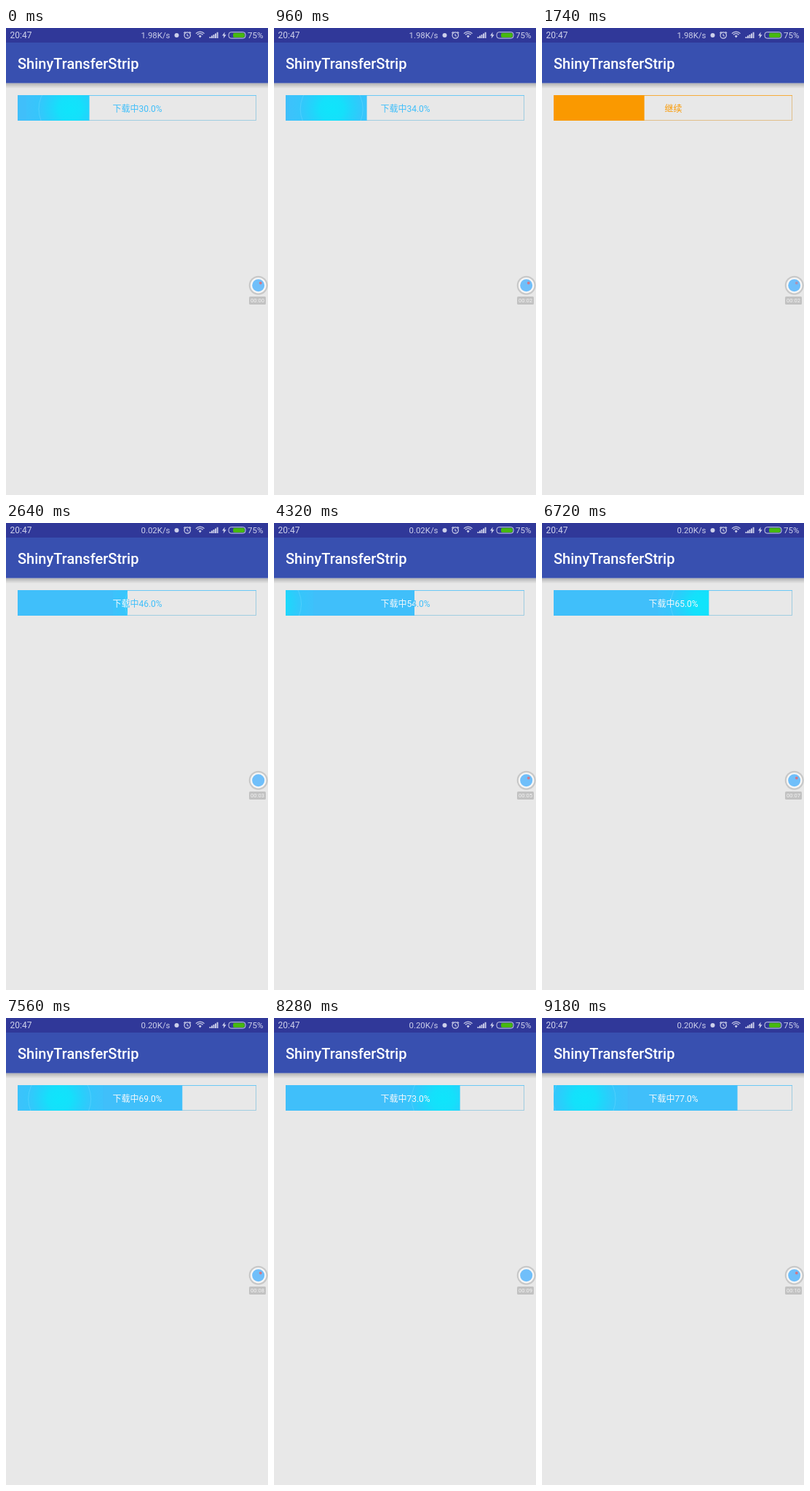
These frames come from a looping animation (360x640 px, 9.24 s). An HTML page:

```html
<!DOCTYPE html>
<html lang="zh-CN">
<head>
<meta charset="utf-8">
<title>Download progress</title>
<style>
  html, body { margin: 0; width: 100%; height: 100%; overflow: hidden; background: #e8e8e8; }
  svg { display: block; width: 100vw; height: 100vh; }
  text { font-family: Roboto, "Noto Sans CJK SC", "Noto Sans CJK", sans-serif; }
  .status { fill: #cdd0ea; }
  .line { fill: none; stroke: #cdd0ea; }
  .label { font-size: 12px; text-anchor: middle; }
</style>
</head>
<body>
<svg viewBox="0 0 360 640">
  <defs>
    <linearGradient id="shadow" x2="0" y2="1">
      <stop offset="0" stop-color="#000" stop-opacity=".24"/>
      <stop offset=".5" stop-color="#000" stop-opacity=".11"/>
      <stop offset="1" stop-color="#000" stop-opacity="0"/>
    </linearGradient>
    <radialGradient id="glow">
      <stop offset="0" stop-color="#0fe5fb"/>
      <stop offset=".27" stop-color="#12e2fb" stop-opacity=".95"/>
      <stop offset=".53" stop-color="#18dafb" stop-opacity=".57"/>
      <stop offset=".75" stop-color="#20d2fb" stop-opacity=".22"/>
      <stop offset="1" stop-color="#28ccfb" stop-opacity="0"/>
    </radialGradient>
    <clipPath id="done"><rect id="doneRect" x="16" y="92" height="35"/></clipPath>
  </defs>

  <rect width="360" height="640" fill="#e8e8e8"/>
  <rect y="75.5" width="360" height="7.5" fill="url(#shadow)"/>
  <rect y="20" width="360" height="55.5" fill="#3850b0"/>
  <rect width="360" height="20" fill="#303899"/>
  <text x="16" y="55.5" font-size="20" font-weight="500" fill="#fff">ShinyTransferStrip</text>

  <g class="status">
    <text x="5.5" y="14" font-size="12">20:47</text>
    <text id="speed" x="225.5" y="14" font-size="11.4" text-anchor="end"></text>
    <text x="332" y="14" font-size="11.6">75%</text>
    <circle cx="234.5" cy="10" r="3"/>
    <path d="M262.4 8.7 263.4 9.7A4.7 4.7 0 0 1 270 9.7L271 8.7A6.1 6.1 0 0 0 262.4 8.7ZM264.7 11.1 266.7 13.6 268.7 11.1A2.8 2.8 0 0 0 264.7 11.1Z"/>
    <path d="M279.5 12h1.9v2h-1.9zM282 10.6h1.9V14H282zM284.5 9h1.9v5h-1.9zM287 7.4h1.9V14H287zM289.6 5.8h1.9V14h-1.9z"/>
    <path d="M300.6 5.5 297 10.6h2.3L298.6 14.5 302.6 9.2h-2.4z"/>
  </g>
  <g class="line">
    <circle cx="249.2" cy="10" r="4.2" stroke-width="1.2"/>
    <path d="M244.3 7 246.4 5.2M254.1 7 252 5.2M249 8v2.4l1.8.9" stroke-width="1.1"/>
    <path d="M260.9 7.6A8 8 0 0 1 272.5 7.6" stroke-width="1.3"/>
    <rect x="306" y="5.7" width="23" height="8.4" rx="3.2" stroke-width="1"/>
  </g>
  <rect x="312" y="6.8" width="15.8" height="6.2" rx="1.8" fill="#46b810"/>

  <g id="bar">
    <path d="M16 126.5H343.5V93" fill="none" stroke="#888" stroke-opacity=".22"/>
    <path d="M16 126.5H343.5V93" fill="none" stroke="currentColor" stroke-opacity=".35"/>
    <path d="M16 92.5H344" fill="none" stroke="currentColor" stroke-opacity=".75"/>
    <text class="label" x="180.5" y="115" fill="currentColor"></text>
    <g clip-path="url(#done)">
      <rect x="16" y="92" width="328" height="35" fill="currentColor"/>
      <g id="flare">
        <rect x="-60" y="92" width="120" height="35" fill="#28ccfb" fill-opacity=".15"/>
        <circle cy="111" r="60" fill="url(#glow)"/>
        <circle cy="111" r="43" fill="none" stroke="#8ce0ff" stroke-opacity=".3"/>
      </g>
      <text class="label" x="180.5" y="115" fill="#f4f8fa"></text>
    </g>
  </g>

  <circle cx="346.7" cy="352.7" r="13" fill="#c8c8c8"/>
  <circle cx="346.7" cy="352.7" r="10.8" fill="#f6f6f6"/>
  <circle cx="346.7" cy="352.7" r="8.5" fill="#70bffa"/>
  <circle id="dot" cx="349.8" cy="349.5" r="1.9" fill="#d07888"/>
  <rect x="334" y="368" width="23" height="11" rx="1.5" fill="#c2c2c2"/>
  <text id="clock" x="345.5" y="376.4" font-size="7.6" text-anchor="middle" fill="#f4f4f4"></text>
</svg>

<script>
const LOOP = 9240, STEP = 60;
const BAR = { x: 16, width: 328 };
const FLARE = { width: 120, speed: 0.22 };
const PAUSE = [1680, 1860];
// [time in ms, percent]
const progress = [[0, 30], [1680, 38], [1860, 38], [2640, 46], [4320, 54],
                  [6720, 65], [8280, 73], [9180, 77], [9240, 77]];
const sweeps = [-600, 400, 1500, 2775, 4145, 5520, 7025, 8716];
const ticks = [0, 180, 360, 2460, 3420, 4320, 5280, 6300, 7260, 8220, 9120];
const speeds = [[0, "1.98K/s"], [2220, "0.02K/s"], [6060, "0.20K/s"]];

const $ = id => document.getElementById(id);
const labels = document.querySelectorAll(".label");
const clamp = v => Math.max(0, Math.min(1, v));

function percentAt(t) {
  const i = progress.findIndex(([end]) => end > t);
  const [t0, p0] = progress[i - 1], [t1, p1] = progress[i];
  return Math.floor(p0 + (p1 - p0) * (t - t0) / (t1 - t0) + 0.05);
}

function draw(t) {
  const percent = percentAt(t);
  const paused = t >= PAUSE[0] && t < PAUSE[1];
  const caption = paused ? "继续" : `下载中${percent}.0%`;
  $("doneRect").setAttribute("width", BAR.width * percent / 100);
  $("bar").style.color = paused ? "#fa9900" : "#40bffa";
  labels.forEach(label => { label.textContent = caption; });

  const start = sweeps.filter(s => s <= t).pop();
  const left = (t - start) * FLARE.speed - FLARE.width;
  $("flare").setAttribute("transform", `translate(${BAR.x + left + FLARE.width / 2} 0)`);
  $("flare").style.display = paused ? "none" : "";

  const seconds = ticks.filter(s => s <= t).length - 1;
  $("clock").textContent = "00:" + String(seconds).padStart(2, "0");
  $("speed").textContent = speeds.filter(([from]) => from <= t).pop()[1];

  // the recording light fades out and in once per second
  const phase = t % 960 / 960;
  $("dot").style.opacity = phase < 0.7 ? clamp((0.62 - phase) / 0.05) : clamp((phase - 0.75) / 0.1);
}

const origin = performance.now();
function frame() {
  const t = (performance.now() - origin) % LOOP;
  draw(Math.floor(t / STEP) * STEP);
  requestAnimationFrame(frame);
}
frame();
</script>
</body>
</html>
```
